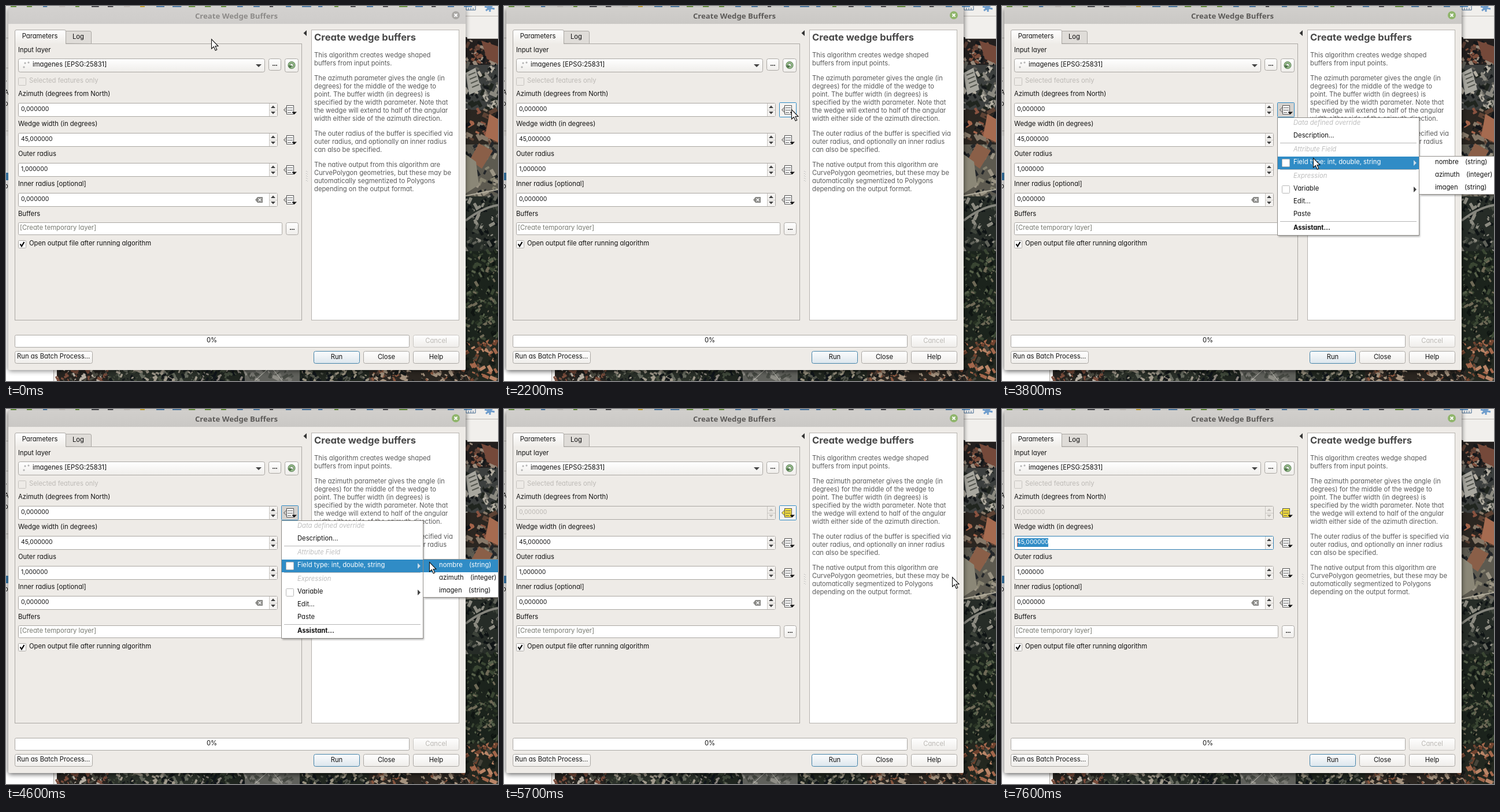
Write an HTML page that moves like this. It is 851x650 px and loops after 8000 ms.

```html
<!DOCTYPE html>
<html lang="en">
<head>
<meta charset="utf-8">
<title>Wedge buffer dialog</title>
<style>
html, body { margin: 0; width: 100%; height: 100%; overflow: hidden; background: #edeae6; }
svg { display: block; }
text { font-family: Inter, "Liberation Sans", sans-serif; font-size: 11.25px; font-feature-settings: "cv11"; fill: #111; white-space: pre; }
</style>
</head>
<body>
<svg id="stage" width="851" height="650" viewBox="0 0 851 650"></svg>
<script>
const BLUE = '#308cc6', BODY = '#eeebe7', EDGE = '#aaa7a3';

// ---- drawing helpers ----
const rect = (x, y, w, h, fill, stroke = 'none', r = 0, extra = '') =>
  `<rect x="${x}" y="${y}" width="${w}" height="${h}" rx="${r}" fill="${fill}" stroke="${stroke}" ${extra}/>`;
const box = (x1, y1, x2, y2, fill = '#fff', stroke = EDGE, r = 2) =>
  rect(x1 + .5, y1 + .5, x2 - x1 - 1, y2 - y1 - 1, fill, stroke, r);
const path = (d, fill = 'none', stroke = 'none', extra = '') =>
  `<path d="${d}" fill="${fill}" stroke="${stroke}" ${extra}/>`;
const text = (x, y, s, extra = '') => `<text x="${x}" y="${y}" ${extra}>${s}</text>`;
const group = (id, body, extra = '') => `<g id="${id}" ${extra}>${body}</g>`;
const centred = (x, y, s, extra = '') => text(x, y, s, 'text-anchor="middle" ' + extra);
const button = (x1, y1, x2, y2, label = '', { stroke = EDGE, color = '#111', fill = 'url(#raised)' } = {}) =>
  box(x1, y1, x2, y2, fill, stroke, 3) +
  centred((x1 + x2) / 2, (y1 + y2) / 2 + 2.5, label, `style="fill:${color}"`);
const moreButton = (x1, y1, x2, y2) => button(x1, y1, x2, y2) +
  [-4, -1, 2].map(dx => rect((x1 + x2) / 2 + dx, (y1 + y2) / 2 + .5, 2, 1.5, '#222')).join('');

let seed = 7;
const rnd = () => (seed = (seed * 16807) % 2147483647) / 2147483647;
const pick = list => list[Math.floor(rnd() * list.length)];

// Aerial view: a base tone scattered with rotated roof and tree patches.
function aerial(x, y, w, h, colors, count, size) {
  let out = rect(x, y, w, h, colors[0]);
  for (let i = 0; i < count; i++) {
    const px = x + rnd() * w, py = y + rnd() * h, s = size * (.3 + rnd());
    out += rect((-s / 2).toFixed(1), (-s / 4).toFixed(1), s.toFixed(1), (s / 2).toFixed(1), pick(colors), 'none', 1,
      `transform="translate(${px.toFixed(1)} ${py.toFixed(1)}) rotate(${pick([-65, -30, 25, 60])})"`);
  }
  return out;
}

function background() {
  const roofs = ['#2b2621', '#a5644a', '#8a5340', '#14161a', '#867868', '#5d4234'];
  const grey = ['#3c3f3e', '#8b8980', '#15181a', '#b3aea2', '#20251f', '#605f58'];
  const trees = ['#1b231c', '#0f1512', '#3a4633', '#56604a', '#263022', '#6f6a57'];
  const right = [
    [57, 45, ['#231f1e', '#7c4d3b', '#14171a', '#98897a', '#5c4035'], 55, 10],
    [102, 78, grey, 80, 11],
    [180, 60, roofs, 50, 13],
    [240, 90, ['#5d5a50', '#85816f', '#24272a', '#14181a', '#9b9484'], 60, 10],
    [330, 95, ['#262c27', '#0f1415', '#60625a', '#8b8a80', '#3e443b'], 90, 9],
    [425, 155, trees, 230, 8],
    [580, 70, ['#23271f', '#a3674b', '#70432f', '#141a16', '#b98567', '#46443a'], 90, 10]
  ].map(([y, h, ...rest]) => aerial(795, y, 56, h, ...rest)).join('');
  const bottom = [
    [88, 90, ['#26231f', '#7a4d3c', '#b9b1a5', '#14181a', '#4a4a40'], 80, 8],
    [178, 160, ['#2a3029', '#666a5f', '#14181a', '#a19a8c', '#434a3c'], 130, 8],
    [338, 75, ['#1f251f', '#414a3c', '#86807a', '#10151a'], 65, 7],
    [413, 95, ['#5f605b', '#777771', '#454842', '#8e8d86'], 30, 10],
    [508, 120, ['#20261f', '#50534a', '#98917f', '#10151a'], 100, 7],
    [628, 175, ['#2b2621', '#8a573f', '#171a19', '#a5937f', '#57443a'], 130, 9]
  ].map(([x, w, ...rest]) => aerial(x, 630, w, 20, ...rest)).join('');
  const landmarks =
    path('M822 60 L851 70 V100 L832 92Z', '#75493a') +
    path('M795 116 L812 107 L822 145 L801 154Z', '#a8a79f') +
    path('M800 120 L812 115 M802 127 L814 122 M804 134 L816 129 M806 141 L818 136', 'none', '#565850', 'stroke-width="2"') +
    path('M836 187 L851 196 V236 L829 226Z', '#a66b50') +
    path('M818 238 L842 251 L823 282 L802 267Z', '#8a5f48') +
    path('M795 257 L813 270 L818 310 L795 325Z', '#8b8777') +
    path('M795 329 L851 318', 'none', '#b3ae9e', 'stroke-width="2"') +
    path('M795 372 Q823 350 851 345', 'none', '#85857d', 'stroke-width="4"') +
    path('M430 650 L452 630 M462 630 L478 650', 'none', '#c4c3ba');
  let icons = '';
  for (let x = 8; x < 795; x += 28)
    icons += rect(x, 0, 6 + rnd() * 10, 2, pick(['#e0b93c', '#76a54a', '#55565a', '#5b8dbd', '#dedad4']));
  const comb = path('M796 0 V7 H812 V0 M800 3 V7 M804 3 V7 M808 3 V7', 'none', '#42688e');
  const gear = path('M828 1 L845 5 M837 -4 V10 M830 8 L844 -3', 'none', '#6f9dcc', 'stroke-width="3"') +
    '<circle cx="836" cy="3" r="4" fill="#6f9dcc"/>';
  const edgeText = [['/', 138], ['A', 154], ['o', 173], ['o', 316]].map(([s, y]) => text(-3, y, s)).join('');
  return rect(0, 0, 851, 650, '#f1efec') + icons + comb + gear +
    path('M795 17.5 H851 M795 56.5 H851 M0 55.5 H4 M0 107.5 H4 M0 216.5 H4', 'none', '#bcb8b3') +
    rect(0, 225, 4, 425, '#fbfaf9') + edgeText + rect(0, 289, 4, 13, '#3e83b6') +
    rect(0, 630, 82, 20, '#fff') + path('M82.5 630 V650', 'none', '#b0aca7') + right + bottom + landmarks;
}

function overrideIcon(y, fill = '#fff') {
  return rect(485.5, y - 7.5, 12, 15, fill, '#555') +
    path(`M480.5 ${y} L485.5 ${y - 5} V${y + 5}Z`, fill === '#fff' ? '#c9c7c4' : fill, '#555') +
    path(`M487 ${y - 3.5} H496 M487 ${y + .5} H496 M487 ${y + 4.5} H493`, 'none', '#555') +
    path(`M494 ${y + 3.5} H503 L498.5 ${y + 8} Z`, '#111');
}

function spinBox(y, value, { off = false, stroke = EDGE } = {}) {
  const ink = off ? '#c3bfbb' : '#444';
  return box(21, y, 470, y + 24, off ? BODY : '#fff', stroke) +
    rect(456, y + 1, 13, 22, off ? BODY : '#f5f3f1') +
    path(`M455.5 ${y + 1} V${y + 23} M456 ${y + 12.5} H469`, 'none', '#c9c6c2') +
    path(`M458 ${y + 9} L462 ${y + 4.5} L466 ${y + 9}Z M458 ${y + 15} L462 ${y + 19.5} L466 ${y + 15}Z`, ink) +
    text(26, y + 14, value, `style="font-size:10.4px;fill:${off ? '#bab7b3' : '#111'}"`);
}

function parameters() {
  const labels = [['Input layer', 80], ['Azimuth (degrees from North)', 156], ['Wedge width (in degrees)', 208],
    ['Outer radius', 260], ['Inner radius [optional]', 312], ['Buffers', 364]];
  return box(15, 65, 512, 545, BODY, EDGE, 0) +
    path('M103.5 65 V43.5 H145 Q147.5 43.5 147.5 46 V65.5 Z', '#dfdcd8', EDGE) +
    path('M15.5 67 V44 Q15.5 41.5 18 41.5 H101 Q103.5 41.5 103.5 44 V65.5', 'url(#tab)', EDGE) +
    rect(16, 65, 87, 2, BODY) +
    centred(58.5, 56, 'Parameters') + centred(125, 57, 'Log') +
    labels.map(([s, y]) => text(21, y, s)).join('') +
    box(21, 91, 448, 115, 'url(#raised)', EDGE, 3) +
    path('M432 101 H442 L437 106Z', '#444') +
    [[31, 106], [33, 99], [39, 98]].map(([x, y]) => `<circle cx="${x}" cy="${y}" r="1.1" fill="#fff" stroke="#777" stroke-width=".7"/>`).join('') +
    text(46, 105, 'imagenes [EPSG:25831]') +
    moreButton(454, 91, 476, 112) + button(482, 91, 506, 115) +
    '<circle cx="494" cy="102.5" r="4.5" fill="none" stroke="#4d7348" stroke-width="4"/>' +
    '<circle cx="494" cy="102.5" r="4.5" fill="none" stroke="#a3c796" stroke-width="2"/>' +
    path('M488 103 H495 L491.500 108Z', '#4d7348') +
    box(21, 124, 35, 138, BODY, '#c5c2be', 1) +
    text(40, 133, 'Selected features only', 'style="fill:#bdbab6"') +
    spinBox(220, '45,000000') + spinBox(272, '1,000000') + spinBox(324, '0,000000') +
    [232, 284, 336].map(y => overrideIcon(y)).join('') +
    path('M431 336 L435 331 H444 V341 H435Z', '#8a8a87') +
    path('M436.500 333.500 L441.500 338.500 M441.500 333.500 L436.500 338.500', 'none', '#fff', 'stroke-width="1.3"') +
    box(21, 375, 478, 397) + text(24, 388, '[Create temporary layer]', 'style="fill:#777970"') +
    moreButton(484, 375, 506, 397) +
    box(21, 406, 35, 420, '#fff', EDGE, 1) +
    path('M24.500 412.500 L27 416.500 L31.500 409', 'none', '#000', 'stroke-width="2.2"') +
    text(40, 415, 'Open output file after running algorithm');
}

function help() {
  const paragraphs = [
    [89, 'This algorithm creates wedge shaped|buffers from input points.'],
    [129, 'The azimuth parameter gives the angle (in|degrees) for the middle of the wedge to|point. The buffer width (in degrees) is|specified by the width parameter. Note that|the wedge will extend to half of the angular|width either side of the azimuth direction.'],
    [225, 'The outer radius of the buffer is specified via|outer radius, and optionally an inner radius|can also be specified.'],
    [279, 'The native output from this algorithm are|CurvePolygon geometries, but these may be|automatically segmentized to Polygons|depending on the output format.']
  ];
  let dots = '';
  for (let y = 286; y < 303; y += 4) dots += rect(519, y, 1, 1, '#aaa') + rect(521, y + 1, 1, 1, '#bbb');
  return path('M520 42 V52 L514.500 47Z', '#333') + dots + box(528, 41, 784, 545, '#fff', '#b5b2ae', 0) +
    text(533, 60, 'Create wedge buffers', 'style="font-size:16.6px;font-weight:bold;fill:#484848"') +
    paragraphs.map(([y, s]) => s.split('|').map((line, i) =>
      text(533, y + i * 14, line, 'style="fill:#5a5a5a"')).join('')).join('');
}

function titleBar(id, fill, ink, close) {
  return group(id, path('M4 31 V6 Q4 2 8 2 H791 Q795 2 795 6 V31Z', fill) +
    centred(398.5, 22, 'Create Wedge Buffers', `style="font:bold 13.2px 'Noto Sans',sans-serif;fill:${ink}"`) +
    `<circle cx="778" cy="16" r="7" fill="${close}"/>` +
    path('M775.500 13.500 L780.500 18.500 M780.500 13.500 L775.500 18.500', 'none', '#fff', 'stroke-width="1.8"'));
}

function dialog() {
  return rect(4, 4, 791, 629, '#000', 'none', 4, 'id="shadow" filter="url(#blur)"') +
    rect(4, 20, 791, 611, BODY, 'none', 2) +
    titleBar('idle', 'url(#idleBar)', '#8d8b89', '#aaa8a5') + titleBar('active', 'url(#activeBar)', '#5c5a58', '#8fb56b') +
    parameters() + help() +
    box(15, 570, 698, 592) + centred(356, 583, '0%') +
    button(704, 570, 784, 592, 'Cancel', { stroke: '#c9c6c2', color: '#bbb8b4' }) +
    box(15, 598, 150, 620, 'url(#raised)', EDGE, 3) + text(19, 611, 'Run as Batch Process...') +
    button(532, 598, 612, 620, 'Run', { stroke: '#4382a8', fill: 'url(#default)' }) +
    button(618, 598, 698, 620, 'Close') + button(704, 598, 784, 620, 'Help');
}

function menu() {
  const item = (y, s, extra = '') => text(504, y, s, extra);
  const heading = 'style="fill:#bdbdbd;font-style:italic"';
  const arrow = y => path(`M712 ${y - 5} L717 ${y} L712 ${y + 5}Z`, '#444');
  const check = y => box(484, y, 498, y + 14, '#fff', '#b7b7b7', 1);
  return group('menu',
    rect(478, 196, 245, 204, '#000', 'none', 0, 'opacity=".3" filter="url(#soft)"') +
    box(476, 193, 722, 398, '#fff', '#8f8c88', 0) +
    path('M481 237.500 H717 M481 283.500 H717 M481 373.500 H717', 'none', '#b5b5b5') +
    item(206, 'Data defined override', heading) + item(228, 'Description...') +
    item(252, 'Attribute Field', heading) + item(298, 'Expression', heading) +
    group('fieldRow', rect(477, 261, 244, 22, BLUE)) + check(265) + arrow(272) +
    text(504, 274, 'Field type: int, double, string', 'id="fieldText"') +
    group('fieldArrow', path('M712 267 L717 272 L712 277Z', '#c5ddee')) +
    check(311) + item(320, 'Variable') + arrow(318) + item(342, 'Edit...') + item(364, 'Paste') +
    item(388, 'Assistant...', 'style="font-weight:bold"'));
}

function submenu() {
  const rows = [['nombre', 801, '(string)'], ['azimuth', 803, '(integer)'], ['imagen', 800, '(string)']];
  return group('submenu',
    rect(724, 263, 130, 66, '#000', 'none', 0, 'opacity=".3" filter="url(#soft)"') +
    box(721, 260, 860, 327, '#fff', '#8f8c88', 0) +
    rect(722, 261, 130, 22, BLUE, 'none', 0, 'id="subRow"') +
    rows.map(([name, x, type], i) => group('sub' + i,
      text(749, 274 + 22 * i, name, 'style="fill:inherit"') + text(x, 274 + 22 * i, type, 'style="fill:inherit"'))).join(''));
}

const gradient = (id, a, b) => `<linearGradient id="${id}" x2="0" y2="1"><stop stop-color="${a}"/><stop offset="1" stop-color="${b}"/></linearGradient>`;
const blur = (id, s) => `<filter id="${id}" x="-20%" y="-20%" width="140%" height="140%"><feGaussianBlur stdDeviation="${s}"/></filter>`;

document.getElementById('stage').innerHTML =
  '<defs>' + gradient('raised', '#fff', '#efedea') + gradient('tab', '#fff', BODY) + gradient('default', '#fbfcfd', '#dce6ed') +
  gradient('idleBar', '#d3d1cf', '#cecccA') + gradient('activeBar', '#d1cfcc', '#cac8c5') +
  blur('blur', 4) + blur('soft', 1.5) + '</defs>' +
  background() + dialog() +
  group('enabled', spinBox(168, '0,000000')) + group('disabled', spinBox(168, '0,000000', { off: true })) +
  box(476, 167, 506, 193, '#f5f3f1', BLUE, 1).replace('<rect', '<rect id="frame"') +
  group('plainIcon', overrideIcon(180)) + group('yellowIcon', overrideIcon(180, '#fbe23e')) +
  group('focus', spinBox(220, '45,000000', { stroke: '#2f7fb3' })) +
  group('selection', rect(26, 224, 54, 15, BLUE) + text(26, 234, '45,000000', 'style="font-size:10.4px;fill:#fff"') +
    path('M26.500 224 V239', 'none', '#c5605c')) +
  menu() + submenu() +
  group('pointer', path('M.5 .5 V17 L4.300 13.500 L7.200 20 L9.800 18.800 L7 12.500 H12 Z', '#fff', '#111', 'stroke-width="1.1"')) +
  group('beam', path('M-3 -8 H3 M0 -8 V8 M-3 8 H3', 'none', '#333'));

// ---- motion ----
const LOOP = 8000, STEP = 100;
const route = [ // time, x, y
  [500, 355, 57], [1000, 401, 126], [1400, 471, 169], [1800, 497, 179], [3100, 497, 179],
  [3200, 531, 248], [3500, 538, 263], [4000, 538, 263], [4600, 732, 265], [4900, 761, 282], [5000, 775, 291],
  [6200, 775, 291], [7100, 404.5, 240.5], [7200, 400.5, 237.5], [7400, 400.5, 237.5], [7500, 90, 236]
];
const eased = new Set([4600, 7100]);

function cursorAt(t) {
  const next = route.findIndex(p => p[0] > t);
  if (next < 1) return (next ? route[route.length - 1] : route[0]).slice(1);
  const [t0, x0, y0] = route[next - 1], [t1, x1, y1] = route[next];
  let k = (t - t0) / (t1 - t0);
  if (eased.has(t1)) k = (1 - Math.cos(Math.PI * k)) / 2;
  return [x0 + (x1 - x0) * k, y0 + (y1 - y0) * k];
}

const $ = id => document.getElementById(id);
const show = (id, on) => { $(id).style.display = on ? '' : 'none'; };

function update(time) {
  const t = Math.floor((time % LOOP) / STEP) * STEP;
  const [x, y] = cursorAt(t);
  const active = t >= 2200, open = t >= 2300 && t < 5700, applied = t >= 5700, typing = t >= 7500;
  show('idle', !active);
  show('active', active);
  $('shadow').setAttribute('opacity', active ? .65 : .45);

  show('enabled', !applied);
  show('disabled', applied);
  show('plainIcon', !applied);
  show('yellowIcon', applied);
  show('frame', t >= 1500 && !typing);
  $('frame').setAttribute('fill', open ? '#d5d2ce' : '#f5f3f1');

  show('menu', open);
  const fieldHover = open && y >= 261;
  show('fieldRow', fieldHover);
  show('fieldArrow', fieldHover);
  $('fieldText').style.fill = fieldHover ? '#fff' : '#111';

  show('submenu', t >= 3700 && open);
  const row = x < 722 ? -1 : Math.floor((y - 261) / 22);
  show('subRow', row >= 0);
  $('subRow').setAttribute('y', 261 + 22 * Math.max(row, 0));
  for (let i = 0; i < 3; i++) $('sub' + i).setAttribute('fill', i === row ? '#fff' : '#111');

  show('focus', typing);
  show('selection', t >= 7600);
  const overField = t > 6200 && x < 455 && y > 220 && y < 244;
  show('pointer', !overField);
  show('beam', overField && t < 7600);
  $(overField ? 'beam' : 'pointer').setAttribute('transform', `translate(${x} ${y})`);
}

const start = performance.now();
function tick() {
  update(performance.now() - start);
  requestAnimationFrame(tick);
}
tick();
</script>
</body>
</html>
```
